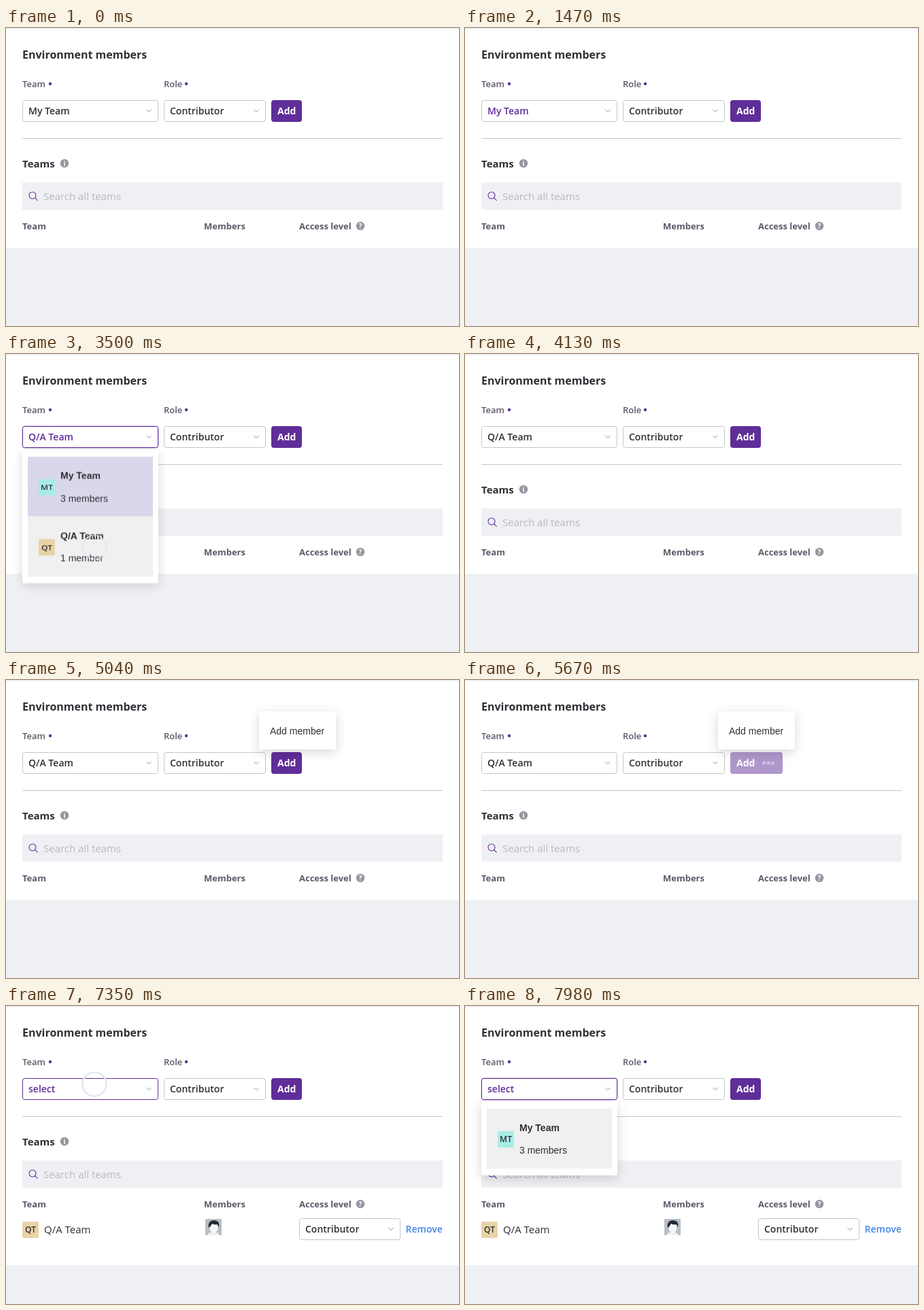
Write an HTML page that moves like this. It is 666 by 438 pixels and loops after 8000 ms.

```html
<!DOCTYPE html>
<html lang="en">
<head>
<meta charset="utf-8">
<title>Environment members</title>
<style>
  html, body { margin: 0; width: 100%; height: 100%; overflow: hidden; background: #eff0f4; }
  svg { display: block; width: 666px; height: 438px; font: 600 14px "Open Sans", sans-serif; fill: #302f35; }
  .bold { font-weight: 700; }
  .title { font-size: 16px; font-weight: 700; }
  .section { font-size: 15px; font-weight: 700; }
  .label, .head { font-size: 13px; fill: #5d5869; }
  .head { font-weight: 700; }
  .hint { font-size: 15px; font-weight: 400; fill: #b9b8c0; }
  .row { font-size: 15px; font-weight: 500; }
  .initials { font-size: 12px; text-anchor: middle; }
  .plain { font: 14px "Liberation Sans", Arial, sans-serif; }
  .plain.bold { font-weight: 700; }
  .white { fill: #fff; }
  .purple { fill: #5f2e98; }
  .line { fill: none; stroke: #8e8c95; }
  .box { fill: #fff; stroke: #c6c5c9; }
  .popup, .tip { filter: drop-shadow(0 4px 8px rgba(0, 0, 0, .16)); }
  .popup { transform-origin: 124px 141px; }
  .ring { fill: none; stroke: #dce5f3; stroke-width: 2.2; transform-box: fill-box; transform-origin: center; }
</style>
</head>
<body>
<svg id="stage" viewBox="0 0 666 438"></svg>
<script>
const LOOP = 8000;
const PURPLE = '#5f2e98', DARK = '#302f35', GREY = '#c6c5c9';
const stage = document.getElementById('stage');

const text = (x, y, words, cls = '', attrs = '') =>
  `<text x="${x}" y="${y}" class="${cls}" ${attrs}>${words}</text>`;
const rect = (x, y, w, h, attrs = '') =>
  `<rect x="${x}" y="${y}" width="${w}" height="${h}" ${attrs}/>`;
const group = (id, body, cls = '') => `<g id="${id}" class="${cls}">${body}</g>`;
const dot = (x, y) => `<circle cx="${x}" cy="${y}" r="2.2" class="purple"/>`;
const badge = (x, y, mark) =>
  `<circle cx="${x}" cy="${y}" r="6.2" fill="#9695a0"/>` +
  text(x, y + 3.6, mark, 'white bold', 'text-anchor="middle" font-size="10"');
const chevron = (x, y) => `<path class="line" d="M${x - 3.5} ${y - 2}l3.5 3.5 3.5-3.5"/>`;
const select = (x, y, w, id) =>
  rect(x + .5, y + .5, w - 1, 31, `rx="3" class="box" id="${id}"`) + chevron(x + w - 14, y + 16);
const initials = (x, y, letters) =>
  rect(x, y, 24, 24, `rx="2" fill="${letters === 'MT' ? '#a9ece7' : '#e8d3a7'}"`) +
  text(x + 12, y + 16.3, letters, 'initials');

const option = (y, id, color, letters, name, count) =>
  rect(32, y, 184, 88, `id="${id}" fill="${color}"`) + initials(48, y + 33, letters) +
  text(80, y + 33, name, 'plain bold') + text(80, y + 66, count, 'plain');
const popup = (id, height, body) =>
  group(id, rect(24, 141, 200, height, 'rx="2" class="white"') + body, 'popup');
const ring = (id, x, y) => `<circle id="${id}" class="ring" cx="${x}" cy="${y}" r="17.5"/>`;

const avatar = `
  <rect x="293" y="313" width="24" height="24" rx="1" fill="#b9bec6"/>
  <path d="M296 337q2-5 9-5t9 5z" fill="#eef0f2"/>
  <ellipse cx="305.5" cy="326" rx="6" ry="7.5" fill="#f5f6f7"/>
  <path d="M298 326q-2-10 7-11 10 0 8 10l-2-4q-5 1-8-1-2 4-5 6z" fill="#202a33"/>`;

stage.innerHTML =
  rect(0, 2, 666, 321, 'class="white"') +
  group('member',
    rect(0, 323, 666, 58, 'class="white"') + initials(24, 317, 'QT') +
    text(56, 334, 'Q/A Team', 'row') + avatar + select(431, 312, 149, 'access') +
    text(440, 333, 'Contributor') + text(587.5, 333, 'Remove', '', 'fill="#4585e6"')) +
  text(24, 45, 'Environment members', 'title') +
  text(24, 87, 'Team', 'label') + dot(65, 82) +
  text(232, 87, 'Role', 'label') + dot(265, 82) +
  rect(23, 105, 202, 34, 'rx="5" fill="#d9cfea" id="glow"') +
  select(24, 106, 200, 'team') +
  group('value', text(33, 127, 'My Team', '', 'id="mine"') +
    text(33, 127, 'Q/A Team', '', 'id="qa"') + text(33, 127, 'select', '', 'id="empty"')) +
  select(232, 106, 150, 'role') + text(241, 127, 'Contributor') +
  group('add', rect(390, 106, 45, 32, 'rx="4" class="purple" id="addBox"') +
    text(399, 127, 'Add', 'white bold') +
    group('dots', [437, 443.5, 450].map(x => rect(x, 119.5, 5, 5, 'rx="2"')).join(''), 'white')) +
  rect(24, 162, 618, 1, 'fill="#c8c6ca"') +
  text(24, 205, 'Teams', 'section') + badge(86, 199, 'i') +
  rect(24, 227, 618, 40, 'rx="1" fill="#eff0f4"') +
  '<path d="M44 246a5 5 0 1 1-10 0 5 5 0 0 1 10 0zm-1.4 3.6 4 4" fill="none" stroke="#5f2e98" stroke-width="1.1"/>' +
  text(55, 253, 'Search all teams', 'hint') +
  text(24, 296, 'Team', 'head') + text(291, 296, 'Members', 'head') +
  text(431, 296, 'Access level', 'head') + badge(521, 291, '?') +
  popup('bothTeams', 196,
    option(151, 'mineOption', '#d9d7eb', 'MT', 'My Team', '3 members') +
    option(239, 'qaOption', '#fff', 'QT', 'Q/A Team', '1 member')) +
  popup('oneTeam', 108, option(151, 'lastOption', '#eff0ef', 'MT', 'My Team', '3 members')) +
  group('tip', rect(372, 46, 113, 56, 'rx="2" class="white"') +
    text(388, 80, 'Add member', 'plain'), 'tip') +
  ring('clickTeam', 130, 115) + ring('clickOption', 130, 284) +
  ring('clickAdd', 412, 121) + ring('clickAgain', 130, 115);

// Plays a table of [ms, value] steps; the first and last values are held to the loop's ends.
function track(id, prop, steps) {
  const all = [[0, steps[0][1]], ...steps, [LOOP, steps[steps.length - 1][1]]];
  document.getElementById(id).animate(
    all.map(([ms, value]) => ({ offset: ms / LOOP, [prop]: value })),
    { duration: LOOP, iterations: Infinity });
}

function show(id, from, to = LOOP, fade = 1) {
  const steps = from > 0 ? [[from, 0], [from + fade, 1]] : [[0, 1]];
  if (to < LOOP) steps.push([to, 1], [to + fade, 0]);
  track(id, 'opacity', steps);
}

function open(id, from, to) {
  show(id, from, to, 140);
  track(id, 'transform', [[from, 'scaleY(.8)'], [from + 140, 'scaleY(1)']]);
}

function click(id, at) {
  track(id, 'opacity', [[at, 0], [at + 50, 1], [at + 150, 1], [at + 290, 0]]);
  track(id, 'transform', [[at, 'scale(.4)'], [at + 140, 'scale(1)']]);
}

show('mine', 0, 3500);
show('qa', 3500, 6300);
show('empty', 6300);
track('value', 'fill', [[980, DARK], [1190, PURPLE], [3710, PURPLE], [3900, DARK], [6860, DARK], [7000, PURPLE]]);
track('team', 'stroke', [[2170, GREY], [2310, PURPLE], [3710, PURPLE], [3900, GREY], [7140, GREY], [7300, PURPLE]]);
track('glow', 'opacity', [[2240, 0], [2400, 1], [3600, 1], [3800, 0], [7370, 0], [7500, 1]]);

click('clickTeam', 2170);
open('bothTeams', 2380, 3500);
track('qaOption', 'fill', [[3010, '#fff'], [3100, '#eff0ef']]);
click('clickOption', 3290);

show('tip', 4200, 6300, 140);
click('clickAdd', 5250);
track('add', 'opacity', [[5400, 1], [5600, .5], [6300, .5], [6440, 1]]);
track('addBox', 'width', [[5400, '45px'], [5600, '77px'], [6300, '77px'], [6440, '45px']]);
track('dots', 'opacity', [[5530, 0], [5670, .4], [6300, .4], [6340, 0]]);
show('member', 6300);

click('clickAgain', 7210);
open('oneTeam', 7420, LOOP);
</script>
</body>
</html>
```
